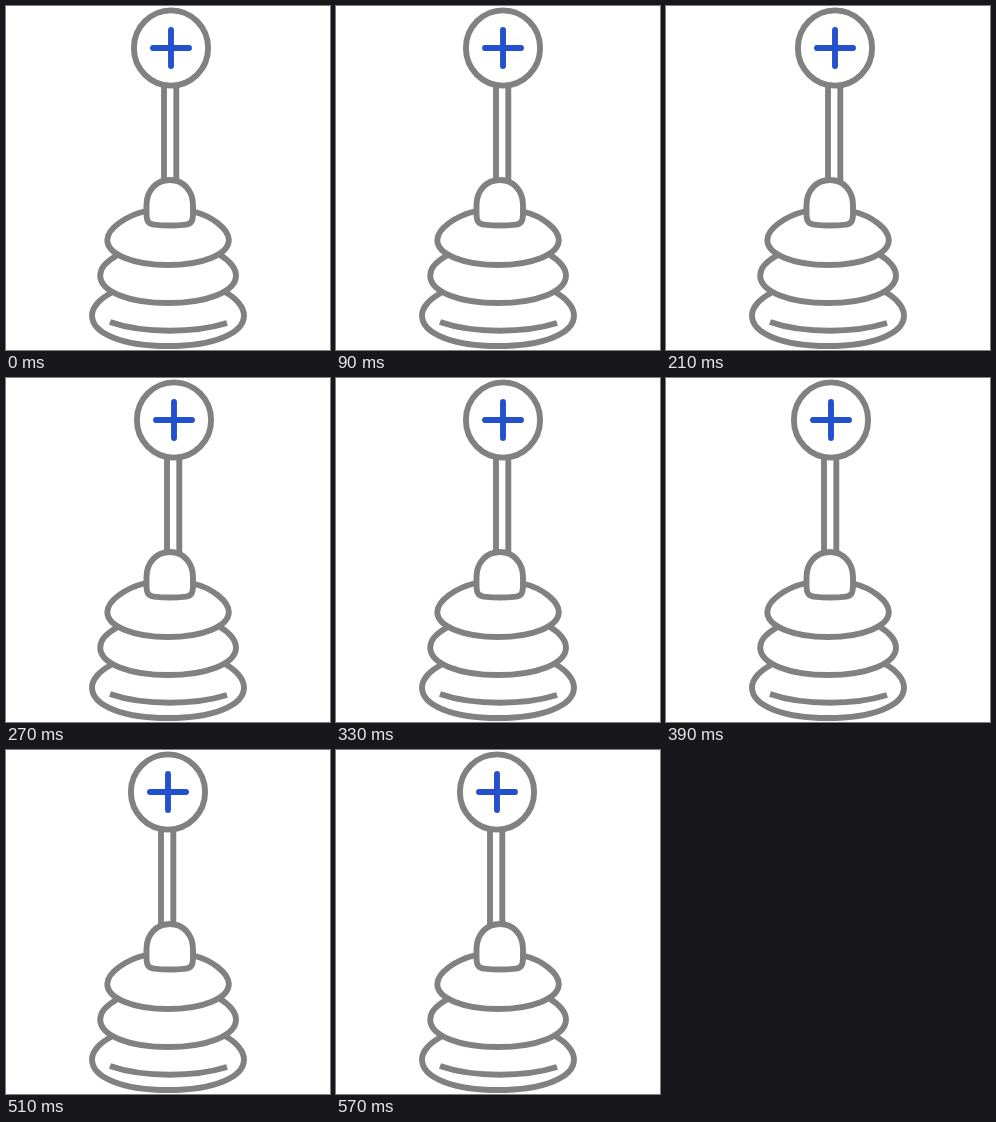
Recreate the animation shown at these times as an HTML page with a canvas. Size 324 by 344 pixels, loop 780 ms.

```html
<!DOCTYPE html>
<html lang="en">
<head>
<meta charset="utf-8">
<title>Wobbling toy</title>
<style>
html, body { margin: 0; width: 100%; height: 100%; overflow: hidden; background: #fff; }
canvas { display: block; }
</style>
</head>
<body>
<canvas id="stage" width="324" height="344"></canvas>
<script>
const ctx = document.getElementById('stage').getContext('2d');
const GRAY = '#818181', BLUE = '#2350cc';
const LOOP = 780, START_X = 165;

// The head moves one pixel at each of these times: right first, then left.
const rightAt = [30, 90, 150, 210];
const leftAt = [270, 330, 360, 390, 450, 480, 510, 570];

const dome = new Path2D('M164 174C150 174 140.5 185 140.5 199V207C140.5 215 142 218 148 218.6' +
  'C158 219.8 170 219.8 180 218.6C185.5 218 187 215 187 207V199C187 185 177.5 174 164 174Z');
const rings = [
  'M140 205C119 210 101.3 223 101.3 234C101.3 248.5 128 259 162 259C196 259 222.8 248.5 222.8 234C222.8 223 206 210 187 205.5',
  'M111 249.5C101 255 94.2 262.5 94.2 269.5C94.2 286 124 297 162 297C200 297 230 286 230 269.5C230 262.5 223.5 254.5 214 249',
  'M105 287C93.5 293 86 301.5 86 309.5C86 328 118 340 162 340C206 340 238 328 238 309.5C238 301 230 292 219 286',
  'M104 316C121 322 141 324.7 164 324.7C186 324.7 204 322.3 221 317'
].map(d => new Path2D(d));

function line(x1, y1, x2, y2) {
  ctx.beginPath();
  ctx.moveTo(x1, y1);
  ctx.lineTo(x2, y2);
  ctx.stroke();
}

function headX(t) {
  const passed = list => list.filter(at => t >= at).length;
  return START_X + passed(rightAt) - passed(leftAt);
}

function drawHead(x) {
  ctx.strokeStyle = GRAY;
  ctx.lineCap = 'butt';
  line(x - 7, 78, x - 7, 175.5);
  line(x + 5.3, 78, x + 5.3, 175.5);
  ctx.beginPath();
  ctx.ellipse(x, 42, 37.1, 37.6, 0, 0, Math.PI * 2);
  ctx.fill();
  ctx.stroke();

  ctx.strokeStyle = BLUE;
  ctx.lineCap = 'round';
  line(x - 18, 42, x + 18, 42);
  line(x, 24, x, 60);
}

function drawBase() {
  ctx.strokeStyle = GRAY;
  ctx.lineCap = 'butt';
  rings.forEach(ring => ctx.stroke(ring));
  ctx.fill(dome);
  ctx.stroke(dome);
}

function draw(t) {
  ctx.fillStyle = '#fff';
  ctx.fillRect(0, 0, 324, 344);
  ctx.lineWidth = 5.9;
  drawHead(headX(t));
  drawBase();
}

const begin = performance.now();
function tick() {
  draw((performance.now() - begin) % LOOP);
  requestAnimationFrame(tick);
}
tick();
</script>
</body>
</html>
```
